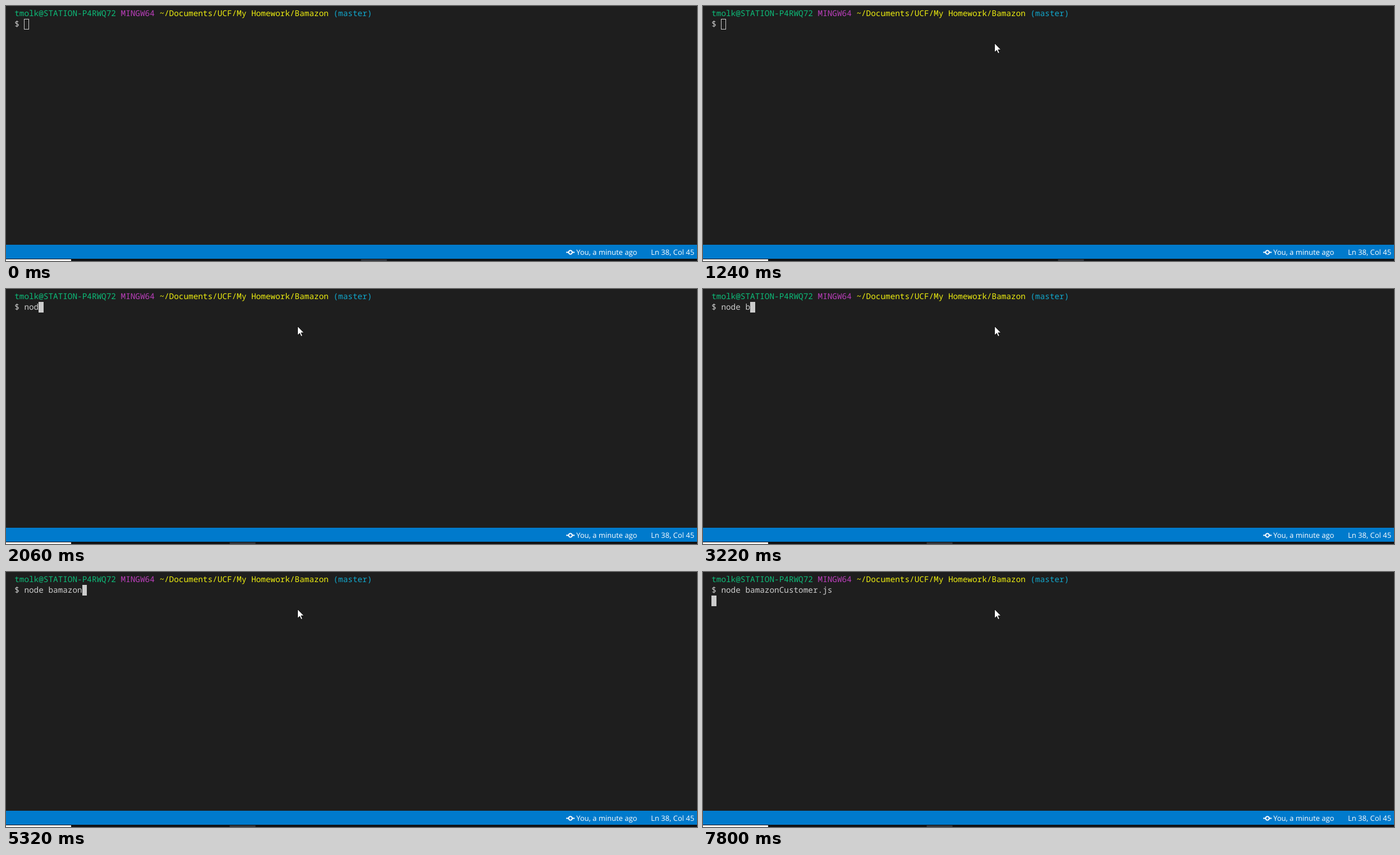
An HTML page that plays this animation: 1231 px wide and 455 px high, repeating every 8 s.

```html
<!DOCTYPE html>
<html lang="en">
<head>
<meta charset="utf-8">
<title>Terminal session</title>
<style>
  html, body { margin: 0; width: 100%; height: 100%; overflow: hidden; background: #1e1e1e; }
  svg { display: block; width: 100%; height: 100%; }
  text { white-space: pre; text-rendering: geometricPrecision; }
  .term { font: 14.35px "Noto Sans Mono", "DejaVu Sans Mono", monospace; fill: #ccc; }
  .status { font: 13px "Open Sans", "Noto Sans", sans-serif; fill: #fff; }
  .user { fill: #0dbc79; }
  .system { fill: #bc3fbc; }
  .path { fill: #eeee10; }
  .branch { fill: #11a8cd; }
</style>
</head>
<body>
<svg viewBox="0 0 1231 455">
  <rect width="1231" height="455" fill="#1e1e1e"/>

  <g class="term">
    <text x="15.2" y="18"><tspan class="user">tmolk@STATION-P4RWQ72</tspan> <tspan class="system">MINGW64</tspan> <tspan class="path">~/Documents/UCF/My Homework/Bamazon</tspan> <tspan class="branch">(master)</tspan></text>
    <text x="15.2" y="37" id="command"></text>
  </g>
  <rect id="caret" stroke="#ccc"/>

  <rect y="426" width="1231" height="25" fill="#007acc"/>
  <g fill="none" stroke="#fff" stroke-width="2">
    <circle cx="1005.5" cy="439.5" r="3.2"/>
    <path d="M998 439.5h4.3M1008.7 439.5h4.3"/>
  </g>
  <g class="status">
    <text x="1016" y="444">You, a minute ago</text>
    <text x="1149" y="444">Ln 38, Col 45</text>
  </g>

  <rect y="451" width="1231" height="4" fill="#101214"/>
  <rect y="452" width="116" height="3" fill="#fff"/>
  <rect id="task" y="452" width="46" height="3" fill="#33363c"/>

  <path id="pointer" d="M.5 .5V16.5L4.2 13L6.8 18.6L9.2 17.6L6.7 12H11.7Z" fill="#fff" stroke="#000" stroke-width=".8"/>
</svg>

<script>
const LOOP = 8000, LEFT = 15.2, CELL = 8.61, ROW = 19;
const COMMAND = "node bamazonCustomer.js ";
const FOCUS = 1290, TASK_SWITCH = 1370, ENTER = 7800;

// [time, number of characters typed]
const typing = [
  [0, 0], [1830, 1], [1910, 2], [2060, 3], [2210, 4], [2290, 5], [3220, 6], [3300, 7],
  [3450, 8], [3620, 9], [5320, 12], [6100, 13], [6240, 14], [6620, 24]
];
// [time, x, y] of the pointer tip
const pointerStops = [
  [530, 723, 290], [610, 667, 262], [840, 607, 186], [920, 551, 119],
  [990, 534, 91], [1070, 525, 76], [1140, 521, 69], [1220, 519, 66]
];

const [command, caret, task, pointer] =
  ["command", "caret", "task", "pointer"].map(id => document.getElementById(id));

const latest = (steps, t) => steps.filter(([time]) => time <= t).pop();

function set(element, attributes) {
  for (const name in attributes) element.setAttribute(name, attributes[name]);
}

function drawCaret(column, row, focused) {
  const x = Math.round(LEFT + column * CELL);
  const right = Math.round(LEFT + (column + 1) * CELL);
  set(caret, {
    x: x + 0.5, y: 4.5 + row * ROW,
    width: right - x - 1, height: ROW - 1,
    fill: focused ? "#ccc" : "none"
  });
}

function draw(t) {
  const typed = latest(typing, t)[1];
  command.textContent = "$ " + COMMAND.slice(0, typed);

  if (t < ENTER) drawCaret(2 + typed, 1, t >= FOCUS);
  else drawCaret(0, 2, true);

  const stop = latest(pointerStops, t);
  set(pointer, stop
    ? { visibility: "visible", transform: `translate(${stop[1]} ${stop[2]})` }
    : { visibility: "hidden" });
  set(task, { x: t < TASK_SWITCH ? 632.5 : 398.5 });
}

const start = performance.now();
function tick() {
  draw((performance.now() - start) % LOOP);
  requestAnimationFrame(tick);
}
tick();
</script>
</body>
</html>
```
